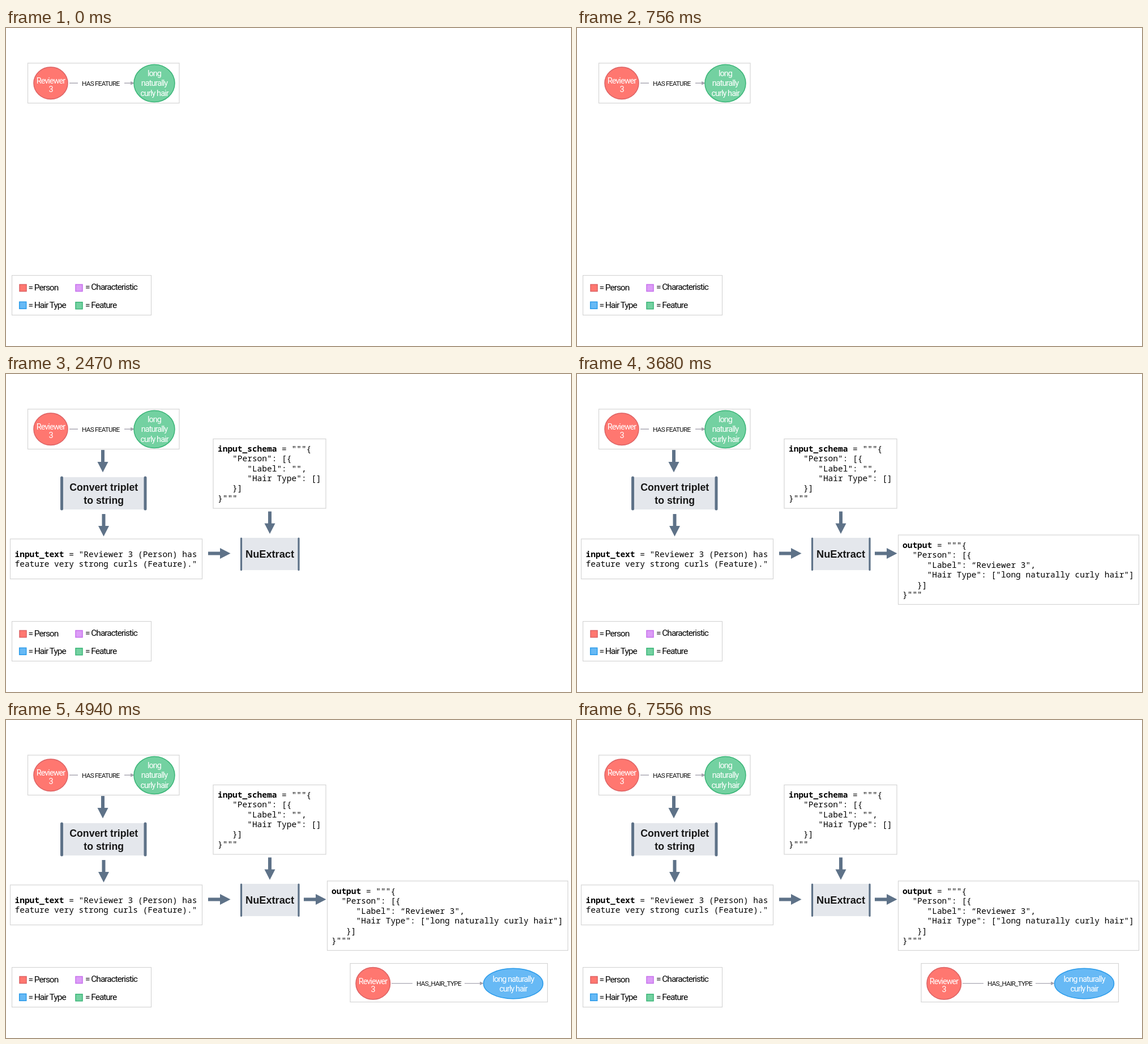
Animation of 998 by 561 pixels, one loop 9.3 s. Source, as an HTML page:

```html
<!DOCTYPE html>
<html lang="en">
<head>
<meta charset="utf-8">
<title>Triplet extraction</title>
<style>
  html, body { margin: 0; width: 100%; height: 100%; overflow: hidden; background: #fff; }
  svg { display: block; width: 998px; height: 561px; }
  text { white-space: pre; }
  .box { fill: #fff; stroke: #d5d5d5; stroke-width: 1.2; }
  .label { font: 15.5px Roboto, "Liberation Sans", sans-serif; letter-spacing: -.066em; }
  .node { font-size: 14.5px; fill: #fff; text-anchor: middle; }
  .edge { font-size: 11.8px; fill: #111; text-anchor: middle; }
  .code { font: 14.5px "Roboto Mono", "Noto Sans Mono", monospace; }
  .code tspan { font-weight: 700; }
  .step { font: 700 17.7px "Liberation Sans", Arial, sans-serif; fill: #161616; text-anchor: middle; }
  .panel { fill: #e4e7ec; }
  .bar { stroke: #5e7288; stroke-linecap: round; fill: none; }
  .link { stroke: #aba9b4; stroke-width: 1.4; }
  .person { fill: #ff7770; stroke: #dc6264; }
  .hair { fill: #67b9f5; stroke: #2a9bea; }
  .trait { fill: #dc9cf7; stroke: #c671ec; }
  .feature { fill: #73d1a1; stroke: #3ab577; }
  .person, .hair, .trait, .feature { stroke-width: 1.5; }
</style>
</head>
<body>
<svg viewBox="0 0 998 561">
  <defs>
    <path id="arrow" d="M-3 0H3V21H9.5L0 39.5L-9.5 21H-3Z" fill="#5e7288"/>
    <path id="tip" d="M-7 -3.2L0 0L-7 3.2Z" fill="#a4a2ad"/>
  </defs>

  <g>
    <rect class="box" x="38.5" y="62" width="267.5" height="70.5"/>
    <path class="link" d="M112 97.3H127M209 97.3H221"/>
    <use href="#tip" x="227" y="97.3"/>
    <ellipse class="person" cx="79" cy="97.3" rx="30" ry="28.3"/>
    <ellipse class="feature" cx="262" cy="97.5" rx="36" ry="33"/>
    <g class="label node">
      <text x="79" y="98">Reviewer</text>
      <text x="79" y="112.5">3</text>
      <text x="262" y="85">long</text>
      <text x="262" y="102">naturally</text>
      <text x="262" y="119.5">curly hair</text>
    </g>
    <text class="label edge" x="167.2" y="102">HAS FEATURE</text>

    <rect class="box" x="10.5" y="436.5" width="246" height="70"/>
    <rect class="person" x="24" y="452.5" width="12" height="12"/>
    <rect class="trait" x="123" y="452.5" width="12" height="12"/>
    <rect class="hair" x="23.7" y="483.2" width="12" height="12"/>
    <rect class="feature" x="123" y="483.7" width="12" height="12"/>
    <g class="label">
      <text x="39.5" y="462.5">= Person</text>
      <text x="140" y="462">= Characteristic</text>
      <text x="39.5" y="494">= Hair Type</text>
      <text x="140" y="494">= Feature</text>
    </g>
  </g>

  <g data-start="1260">
    <use href="#arrow" x="171" y="134"/>
    <rect class="panel" x="98" y="182" width="148" height="57"/>
    <path class="bar" stroke-width="5" d="M98.5 183V238M246 183V238"/>
    <text class="step" x="172.7" y="206.3">Convert triplet</text>
    <text class="step" x="172.7" y="228.5">to string</text>
    <use href="#arrow" x="172.5" y="247"/>
    <rect class="box" x="7.5" y="291" width="339" height="70.5"/>
    <g class="code">
      <text x="15.5" y="322.7"><tspan>input_text</tspan> = "Reviewer 3 (Person) has</text>
      <text x="15.5" y="340">feature very strong curls (Feature)."</text>
    </g>
  </g>

  <g data-start="2470">
    <use href="#arrow" transform="translate(357 316.5) rotate(-90)"/>
    <rect class="box" x="366" y="114.5" width="199" height="122.5"/>
    <g class="code">
      <text x="374" y="137"><tspan>input_schema</tspan> = """{</text>
      <text x="374" y="154.3">   "Person": [{</text>
      <text x="374" y="171.7">      "Label": "",</text>
      <text x="374" y="189">      "Hair Type": []</text>
      <text x="374" y="206.4">   }]</text>
      <text x="374" y="223.8">}"""</text>
    </g>
    <use href="#arrow" x="466" y="242.5"/>
    <rect class="panel" x="415.5" y="289" width="101.5" height="57"/>
    <path class="bar" stroke-width="3.2" d="M415.5 290V345.5M517 290V345.5"/>
    <text class="step" style="font-size:18.2px" x="466" y="324.3">NuExtract</text>
  </g>

  <g data-start="3680">
    <use href="#arrow" transform="translate(526 316.5) rotate(-90)"/>
    <rect class="box" x="567.5" y="284" width="425" height="122.5"/>
    <g class="code">
      <text x="575" y="307"><tspan>output</tspan> = """{</text>
      <text x="575" y="324.4">  "Person": [{</text>
      <text x="575" y="341.8">     "Label": “Reviewer 3",</text>
      <text x="575" y="359">     "Hair Type": ["long naturally curly hair"]</text>
      <text x="575" y="376.5">   }]</text>
      <text x="575" y="394">}"""</text>
    </g>
  </g>

  <g data-start="4940">
    <rect class="box" x="608" y="429.5" width="348.5" height="68"/>
    <path class="link" d="M681 464.6H718M810 464.6H838"/>
    <use href="#tip" x="844" y="464.6"/>
    <ellipse class="person" cx="648.3" cy="464.8" rx="30.3" ry="28.3"/>
    <ellipse class="hair" cx="896" cy="465" rx="52.5" ry="26.7"/>
    <g class="label node">
      <text x="648" y="466">Reviewer</text>
      <text x="648" y="480.3">3</text>
      <text x="896" y="461.7">long naturally</text>
      <text x="896" y="478.7">curly hair</text>
    </g>
    <text class="label edge" x="764.5" y="469">HAS_HAIR_TYPE</text>
  </g>
</svg>
<script>
  const LOOP = 9300;
  const stages = [...document.querySelectorAll("[data-start]")];
  const begin = performance.now();

  function draw() {
    const time = (performance.now() - begin) % LOOP;
    for (const stage of stages) {
      stage.style.display = time >= stage.dataset.start ? "" : "none";
    }
    requestAnimationFrame(draw);
  }
  draw();
</script>
</body>
</html>
```
